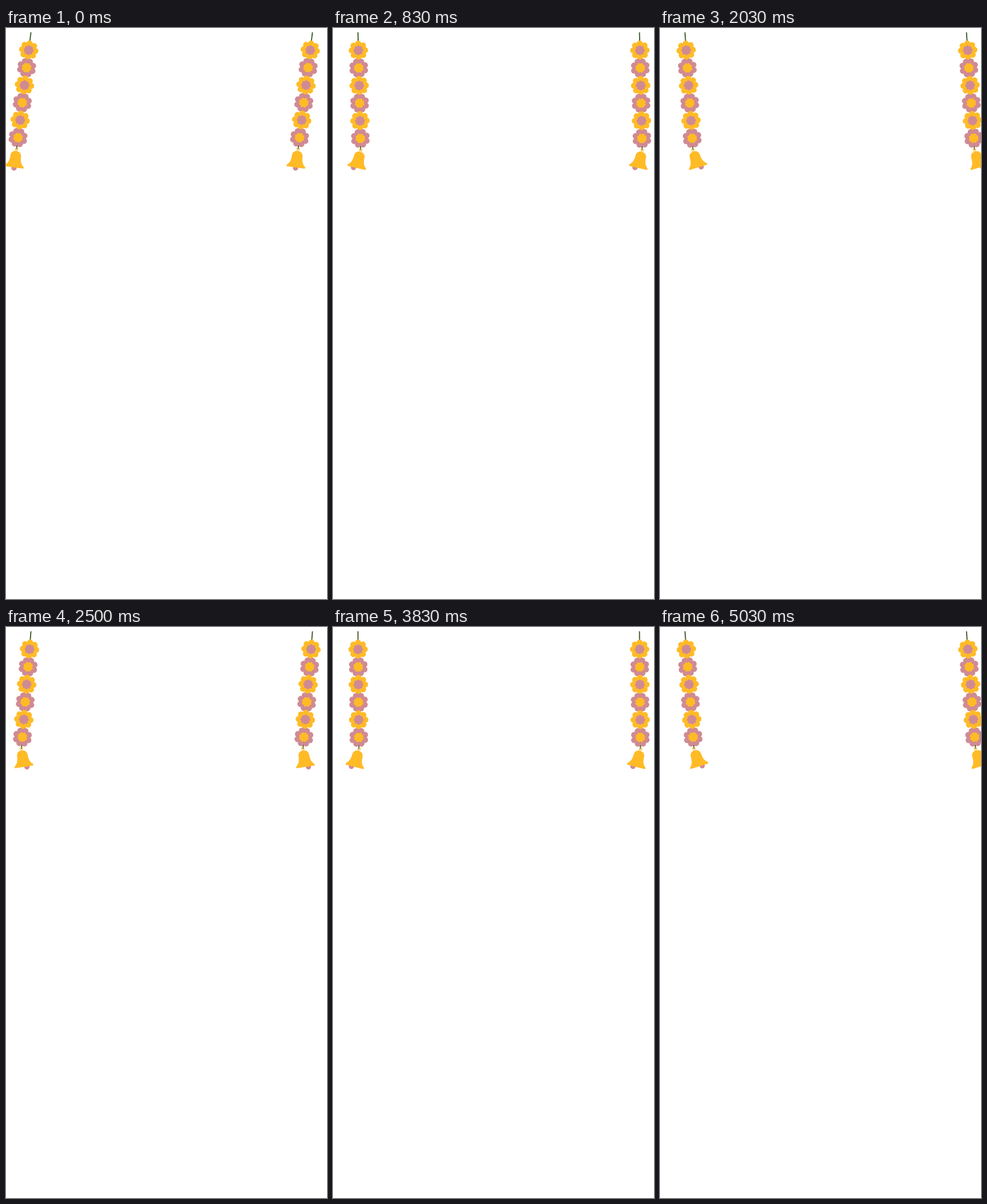
Write an HTML page that moves like this. It is 561 by 998 pixels and loops after 5.06 s.

```html
<!DOCTYPE html>
<html lang="en">
<head>
<meta charset="utf-8">
<title>Swinging garlands</title>
<style>
  html, body { margin: 0; width: 100%; height: 100%; overflow: hidden; background: #fff; }
  svg { display: block; }
</style>
</head>
<body>
<svg width="561" height="998" viewBox="0 0 561 998">
  <defs>
    <g id="garland">
      <path d="M0 0V206" stroke="#35521f" stroke-width="1.8"/>
      <g id="flowers"></g>
      <g id="bell">
        <circle id="clapper" cy="32" r="4.6" fill="#d08a94"/>
        <g fill="#ffbb26">
          <circle cy="-1" r="2.3" fill="none" stroke="#ffbb26"/>
          <path d="M0 2C6 2 9 5.5 9.3 10.5C9.6 19.5 11 23.5 16 28Q17.5 31 15 31H-15Q-17.5 31 -16 28C-11 23.5 -9.6 19.5 -9.3 10.5C-9 5.5 -6 2 0 2Z"/>
        </g>
      </g>
    </g>
  </defs>
  <use href="#garland" x="43.6" y="7.5"/>
  <use href="#garland" x="535.6" y="7.5"/>
</svg>
<script>
const LOOP = 5060, PERIOD = 60.7;
const YELLOW = '#ffbb26', PINK = '#d08a94';
const byId = id => document.getElementById(id);

// Scalloped disc with eight petals
function blossom(y, size, color, turn) {
  let s = `<g fill="${color}" transform="translate(0 ${y}) rotate(${turn}) scale(${size})"><circle r="0.74"/>`;
  for (let i = 0; i < 8; i++) s += `<circle cx="0.69" r="0.31" transform="rotate(${i * 45})"/>`;
  return s + '</g>';
}

let flowers = '';
for (let i = 0; i < 6; i++) {
  const y = 31.5 + 30.8 * i, pink = i % 2, turn = pink * 22.5;
  flowers += blossom(y, 17, pink ? PINK : YELLOW, turn) + blossom(y, 8.6, pink ? YELLOW : PINK, turn);
}
byId('flowers').innerHTML = flowers;

// Ease from 1 to -1, steepest slightly after halfway
function swing(u) {
  const mid = 0.525, power = 2.7;
  return u < mid ? 1 - (u / mid) ** power : ((1 - u) / (1 - mid)) ** power - 1;
}

function draw(now) {
  const t = now % LOOP;
  const step = 2 * Math.floor(t / 100) + (t % 100 >= 30 ? 1 : 0);
  const phase = step / PERIOD % 1;
  const angle = 7 * swing(1 - Math.abs(1 - 2 * phase));
  const lag = 15 * Math.sin(2 * Math.PI * (step + 0.3) / PERIOD);
  byId('garland').setAttribute('transform', `rotate(${angle})`);
  byId('bell').setAttribute('transform', `translate(0 207) rotate(${lag})`);
  byId('clapper').setAttribute('transform', `rotate(${lag * 0.67})`);
}

const start = performance.now();
function tick() {
  draw(performance.now() - start);
  requestAnimationFrame(tick);
}
tick();
</script>
</body>
</html>
```
